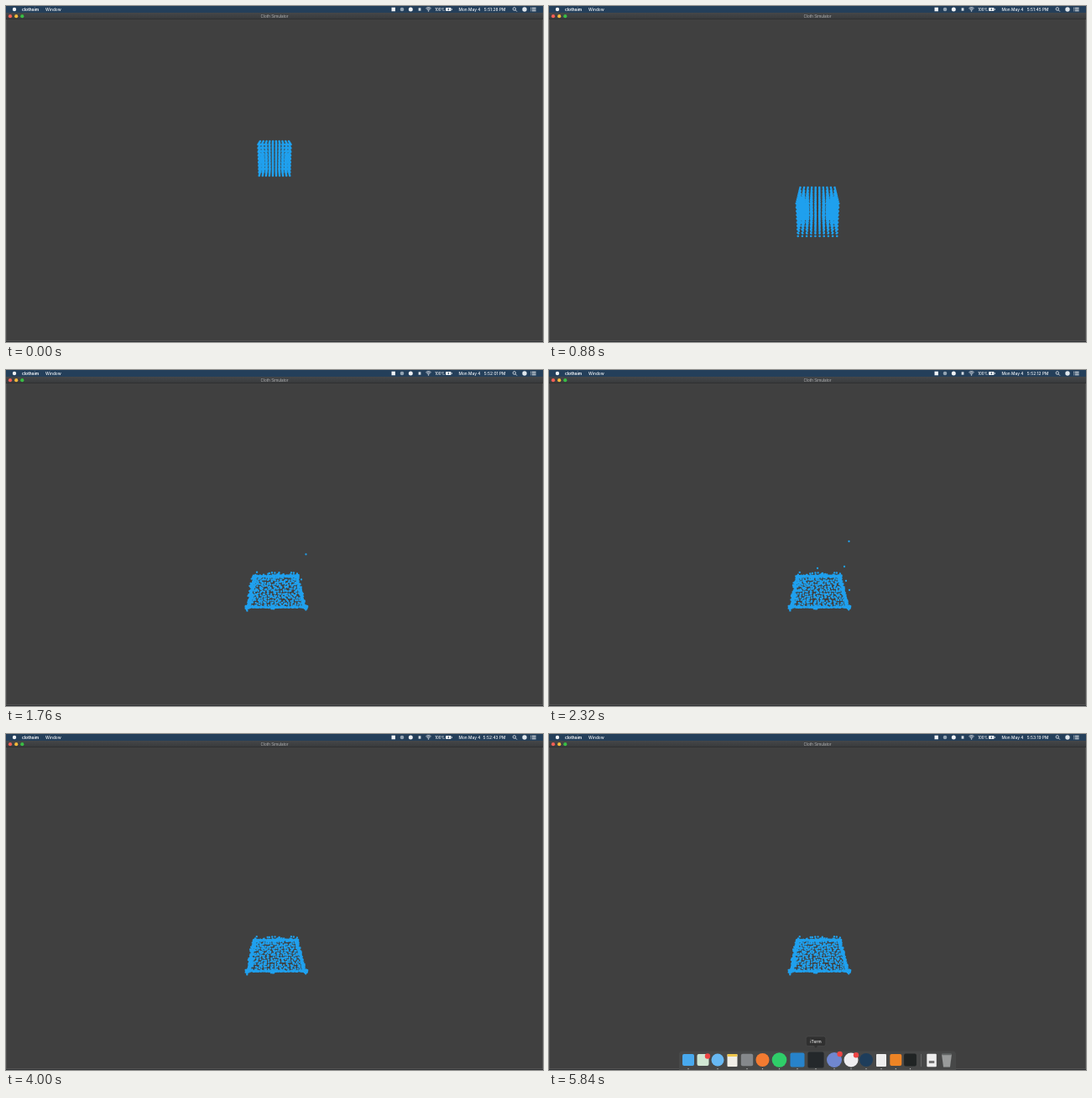
Recreate the animation shown at these times as an HTML page with a canvas. Size 640 px wide and 400 px high, loop 5.92 s.

```html
<!DOCTYPE html>
<html lang="en">
<head>
<meta charset="utf-8">
<title>Cloth Simulator</title>
<style>
html, body { margin: 0; width: 100%; height: 100%; overflow: hidden; background: #404040; }
canvas { display: block; width: 640px; height: 400px; }
</style>
</head>
<body>
<canvas id="stage" width="640" height="400"></canvas>
<script>
const ctx = document.getElementById('stage').getContext('2d');
const STEP = 80, LOOP = 5920, LAST = 73, SIDE = 10;
const BLUE = '#1fa0ee';
const FONT = 'Inter, "Open Sans", sans-serif';

let seed = 7;
function rnd() {
  seed = (seed * 1664525 + 1013904223) % 4294967296;
  return seed / 4294967296;
}
const spread = r => (rnd() * 2 - 1) * r;
const clamp01 = v => Math.max(0, Math.min(1, v));

function rect(x, y, w, h, color, r = 0) {
  ctx.fillStyle = color;
  ctx.beginPath();
  ctx.roundRect(x, y, w, h, r);
  ctx.fill();
}
function disc(x, y, r, color) {
  ctx.fillStyle = color;
  ctx.beginPath();
  ctx.arc(x, y, r, 0, 7);
  ctx.fill();
}
function text(str, x, y, size, color, align = 'left', weight = 500) {
  ctx.font = `${weight} ${size}px ${FONT}`;
  ctx.fillStyle = color;
  ctx.textAlign = align;
  ctx.textBaseline = 'alphabetic';
  ctx.fillText(str, x, y);
}

// Block of particles in free fall: quadratic through three poses.
// Each corner is [y, width] at steps 0, 7 and 11.
const corners = {
  backTop: [[161, 34], [185, 40], [216, 41]],
  frontTop: [[165, 39], [195, 49], [235, 50.5]],
  frontLow: [[202, 36.5], [239, 45], [274, 46.5]]
};
function corner(name, n) {
  const [a, b, c] = corners[name];
  const la = (n - 7) * (n - 11) / 77;
  const lb = n * (n - 11) / -28;
  const lc = n * (n - 7) / 44;
  const y = a[0] * la + b[0] * lb + c[0] * lc;
  const q = 1 / (a[1] * la + b[1] * lb + c[1] * lc);
  return { q, yq: y * q };
}
// Perspective is affine in 1/width and y/width.
function falling(p, n) {
  const f = corner('frontTop', n), b = corner('backTop', n), l = corner('frontLow', n);
  const mix = k => f[k] + p.w * (b[k] - f[k]) + (1 - p.v) * (l[k] - f[k]);
  const q = mix('q');
  return { x: 320 + (p.u - 0.5) / q, y: mix('yq') / q };
}

// Resting places on the floor of the box; w runs from front to back.
function floorAt(u, w, dx = 0, dy = 0) {
  const left = 287.8 + 6.7 * w, right = 357.2 - 9 * w;
  return { x: left + (right - left) * u + dx, y: 282.3 - 37 * w + dy };
}
function makeRest() {
  const out = [];
  const add = (n, make) => { for (let i = 0; i < n; i++) out.push(make(i)); };
  add(286, i => floorAt(0.085 + (i % 22) * 0.0395, 0.07 + Math.floor(i / 22) * 0.073, spread(0.9), spread(0.85)));
  add(140, () => floorAt(0, rnd(), rnd() * 4, spread(0.8)));
  add(140, () => floorAt(1, rnd(), -rnd() * 3.4, spread(0.8)));
  add(160, () => floorAt(rnd(), 0, 0, spread(0.6)));
  add(150, () => floorAt(rnd(), 1, 0, spread(0.7)));
  add(30, () => floorAt(0, 0, spread(2.2), spread(1.6)));
  add(30, () => floorAt(1, 0, spread(2), spread(1.6)));
  add(3, i => floorAt(0, 0, -0.5, 2 + i));
  add(3, i => floorAt(1, 0, 0, 1 + i));
  add(10, () => floorAt(0.43, 0, spread(2), rnd() * 2));
  add(24, () => floorAt(rnd(), 1, 0, -1 - rnd() * 3.2));
  add(8, () => floorAt(0, 0.3 + rnd() * 0.55, -rnd() * 1.6));
  add(16, () => floorAt(0.5 + spread(0.4), 0.06 + rnd() * 0.9));
  return out;
}

// Last step at which a resting particle still trembles.
function calmStep(r) {
  if (r.y > 277 || r.x < 289) return 20 + rnd() * 12;
  if (r.x < 299) return 24 + rnd() * 30;
  return 24 + rnd() * rnd() * (r.x > 347 ? 48 : 40);
}

// Match floor places to the grid column by column, back to front.
function makeParticles() {
  const rest = makeRest().sort((a, b) => a.x - b.x);
  const list = [], m = SIDE - 1;
  for (let i = 0; i < SIDE; i++) {
    const slab = rest.slice(i * 100, i * 100 + 100).sort((a, b) => a.y - b.y);
    slab.forEach((r, k) => list.push({
      u: i / m, v: (k % SIDE) / m, w: 1 - Math.floor(k / SIDE) / m,
      rest: r, calm: calmStep(r), phase: rnd() * 6.28, rate: 0.4 + rnd()
    }));
  }
  return list;
}
const particles = makeParticles();

// Splashes: x, peak y, step of the peak.
const splashes = [
  [295, 239, 17], [299, 238, 17], [311, 241, 16], [326, 240, 17], [332, 240.5, 18],
  [341, 237, 17], [348, 239, 18], [357.5, 204, 29], [352, 234, 29], [320, 236, 29],
  [354, 251, 29], [358, 262, 29]
];

function place(p, n) {
  const land = 11.8 + 2.6 * p.v;
  const a = falling(p, Math.min(n, land));
  if (n <= land) return a;
  const k = clamp01((n - land) / 2.6);
  const e = k * (2 - k);
  const amp = 1.1 * clamp01((p.calm - n) / 24);
  const turn = n * p.rate + p.phase;
  return {
    x: a.x + (p.rest.x - a.x) * e + Math.sin(turn) * amp,
    y: a.y + (p.rest.y - a.y) * e + Math.cos(turn * 1.3) * amp * 0.7
  };
}

function drawParticles(n) {
  ctx.fillStyle = BLUE;
  ctx.beginPath();
  const dot = (x, y, r) => { ctx.moveTo(x + r, y); ctx.arc(x, y, r, 0, 6.2832); };
  for (const p of particles) {
    const { x, y } = place(p, n);
    dot(x, y, n < 13 ? 1.3 : 1.2);
  }
  for (const [x, top, at] of splashes) {
    const y = top + 0.315 * (n - at) ** 2;
    const base = x > 350 ? 275 : 246;
    if (n > 13 && y < base) dot(x, y, 1.15);
  }
  ctx.fill();
}

function clock(n) {
  const s = Math.floor(n <= 50 ? n * 1.5 + 0.6 : 75.6 + (n - 50) * 1.548);
  const total = 51 * 60 + 28 + s;
  return `5:${Math.floor(total / 60)}:${String(total % 60).padStart(2, '0')}`;
}

function drawMenuBar(n) {
  const white = '#f0f3f6';
  rect(0, 0, 640, 8, '#243f5a');
  disc(10, 4, 2.2, white);
  text('clothsim', 19, 5.8, 4.8, white, 'left', 700);
  text('Window', 47, 5.8, 4.8, white);
  rect(459.5, 1.7, 4.4, 4.6, white);
  disc(472, 4, 2.3, '#93a3b2');
  disc(482.3, 4, 2.5, white);
  rect(491.6, 2.3, 2.8, 3.4, '#d5dce3');
  ctx.strokeStyle = white;
  ctx.lineWidth = 0.8;
  for (const r of [1.6, 3, 4.4]) {
    ctx.beginPath();
    ctx.arc(503.5, 6, r, -Math.PI * 0.75, -Math.PI * 0.25);
    ctx.stroke();
  }
  disc(503.5, 5.9, 0.7, white);
  text('100%', 511.3, 5.6, 4.3, white);
  rect(524, 2, 6.5, 4, white, 0.8);
  rect(531, 3.2, 0.8, 1.6, white);
  rect(526.8, 2.8, 1, 2.4, '#243f5a');
  text('Mon May 4', 539.5, 5.8, 4.85, white);
  text(clock(n), 586.6, 5.8, 4.85, white, 'right');
  text('PM', 595.5, 5.8, 4.85, white, 'right');
  ctx.beginPath();
  ctx.arc(605.8, 3.5, 1.7, 0, 7);
  ctx.moveTo(607, 4.7);
  ctx.lineTo(608.9, 6.6);
  ctx.stroke();
  disc(618, 4, 2.7, '#dfe6ec');
  for (const y of [1.8, 3.6, 5.4]) {
    rect(625.3, y, 1, 0.9, white);
    rect(627, y, 4.6, 0.9, white);
  }
}

function drawWindow() {
  rect(0, 8, 640, 392, '#404040');
  const g = ctx.createLinearGradient(0, 8, 0, 16);
  g.addColorStop(0, '#454749');
  g.addColorStop(1, '#37393b');
  rect(0, 8, 640, 8, g);
  rect(0, 15.4, 640, 0.6, '#292929');
  disc(5, 12.2, 2.1, '#f45f55');
  disc(12.2, 12.2, 2.1, '#f3b83b');
  disc(19.3, 12.2, 2.1, '#39bd45');
  text('Cloth Simulator', 320, 13.9, 4.6, '#b5b6b7', 'center', 400);
  rect(0, 16, 0.6, 383, '#595959');
  rect(639.3, 16, 0.7, 383, '#595959');
  rect(0, 398.2, 640, 0.7, '#575757');
  rect(0, 399, 640, 1, '#303234');
}

// Dock items: centre x, half size, colour, round?
const dock = [
  [166, 7, '#48a9ee'], [183.5, 7, '#cfe6d2'], [201, 7.5, '#67b8f3', 1],
  [236, 7.2, '#85888b'], [254.5, 8, '#f47b31', 1], [274.5, 8.8, '#2fce69', 1],
  [296, 8.5, '#2783cb'], [318, 9.6, '#24282b'], [340, 9, '#7087d0', 1],
  [360, 8.5, '#f0eef0', 1], [378, 8, '#1e3d5b', 1], [413.3, 7, '#ee8425'],
  [430.5, 7.4, '#202424']
];

function drawDock() {
  rect(155, 377.5, 330, 26, '#474848', 4);
  for (const [x, r, color, round] of dock) {
    if (round) disc(x, 388, r, color);
    else rect(x - r, 388 - r, r * 2, r * 2, color, 2);
    if (x !== 183.5) disc(x, 398.6, 0.7, '#d0d0d0');
  }
  rect(212.5, 381, 12, 15, '#f0eee7', 1);
  rect(212.5, 381, 12, 3, '#eec64c', 1);
  rect(390, 381, 12, 15, '#eeeeee', 1);
  disc(396, 398.6, 0.7, '#d0d0d0');
  for (const [x, y] of [[189, 383.5], [346.6, 381], [366, 382.2]]) disc(x, y, 3.2, '#ed4544');
  rect(443.3, 381, 0.7, 15, '#737373');
  rect(450.3, 380.8, 11.5, 15.5, '#eeeeee', 1);
  rect(452.8, 389, 6.5, 3, '#777777');
  ctx.fillStyle = '#999b9b';
  ctx.beginPath();
  ctx.moveTo(468, 381);
  ctx.lineTo(480, 381);
  ctx.lineTo(478, 396.5);
  ctx.lineTo(470, 396.5);
  ctx.fill();
  rect(468, 380.3, 12, 2, '#626565', 1);
  rect(306.3, 360, 23.5, 11.5, '#303030', 2.5);
  ctx.strokeStyle = '#505050';
  ctx.lineWidth = 0.5;
  ctx.stroke();
  ctx.fillStyle = '#303030';
  ctx.beginPath();
  ctx.moveTo(315.8, 371.3);
  ctx.lineTo(320.2, 371.3);
  ctx.lineTo(318, 373.8);
  ctx.fill();
  text('iTerm', 318, 367.6, 5, '#eeeeee', 'center');
}

function frame(now) {
  const n = Math.floor((now % LOOP) / STEP);
  drawWindow();
  drawMenuBar(n);
  drawParticles(n);
  if (n === LAST) drawDock();
}

const start = performance.now();
function tick() {
  frame(performance.now() - start);
  requestAnimationFrame(tick);
}
tick();
</script>
</body>
</html>
```
